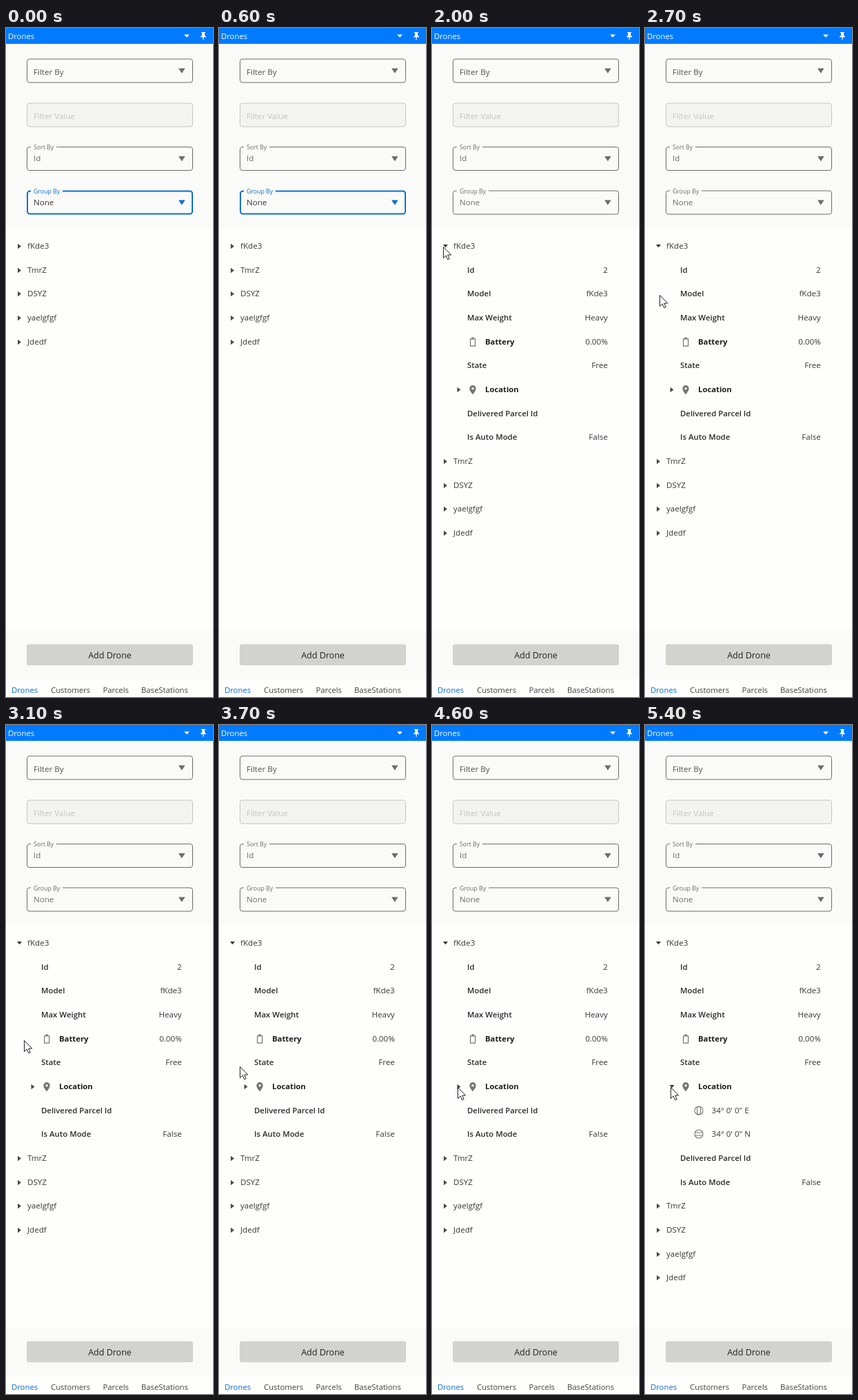
These frames come from a looping animation (300x970 px, 5.5 s). An HTML page:

```html
<!DOCTYPE html>
<html lang="en">
<head>
<meta charset="utf-8">
<title>Drones panel</title>
<style>
  html, body { margin: 0; width: 100%; height: 100%; overflow: hidden; background: #fefefc; }
  svg { display: block; width: 300px; height: 970px; }
  text { font-family: "Open Sans", "Noto Sans", sans-serif; white-space: pre; }
</style>
</head>
<body>
<svg id="stage" viewBox="0 0 300 970" xmlns="http://www.w3.org/2000/svg"></svg>
<script>
const LOOP = 5500, STEP = 100;
const OPEN_DRONE = 1800, OPEN_LOCATION = 4800;
const BLUE = '#0c70cf', GREY = '#6c6c6c', INK = '#363636';

// time, x, y of the pointer tip
const pointerPath = [
  [1000, -14, 352], [1300, 17, 319], [1600, 16, 317], [2300, 16, 317],
  [3100, 26, 457], [3600, 29, 490], [4300, 37, 525], [LOOP, 37, 525]
];

const text = (x, y, str, { size = 11.4, fill = INK, weight = 400, anchor = 'start' } = {}) =>
  `<text x="${x}" y="${y}" font-size="${size}" fill="${fill}" font-weight="${weight}" text-anchor="${anchor}">${str}</text>`;
const rect = (x, y, w, h, fill, extra = '') =>
  `<rect x="${x}" y="${y}" width="${w}" height="${h}" fill="${fill}" ${extra}/>`;
const path = (d, fill, extra = '') => `<path d="${d}" fill="${fill}" ${extra}/>`;
const group = (id, body) => `<g id="${id}">${body}</g>`;

// The outline lies inside the field's 241 x 35 box, whatever its width.
function field(y, value, { label, gap = 0, stroke = GREY, color = GREY, width = 1, fill = 'none', arrow = true, valueY = 21 } = {}) {
  let out = rect(30 + width / 2, y + width / 2, 241 - width, 35 - width, fill,
    `rx="3.5" stroke="${stroke}" stroke-width="${width}"`);
  if (label) {
    out += rect(36, y - 1, gap, 4, '#fafaf8');
    out += text(40, y + 4, label, { size: 8.75, fill: stroke });
  }
  out += text(40, y + valueY, value, { size: 11.6, fill: color });
  if (arrow) out += path(`M250 ${y + 14}h9.6l-4.8 7.2z`, stroke);
  return out;
}

const rowY = i => Math.round(316 + 34.67 * i);
const closedArrow = (x, y) => path(`M${x} ${y - 3.2}l5 3.7l-5 3.7z`, '#4a4a4a');
const openArrow = (x, y) => path(`M${x - 1} ${y - 2}h7l-3.5 4.3z`, '#333');

const batteryIcon = y =>
  path(`M55.6 ${y - 4.2}h7v10.4h-7z`, 'none', 'stroke="#757575" stroke-width="1.2"') +
  rect(57.2, y - 6.4, 3.8, 2, '#757575');
const placeIcon = y =>
  path(`M59 ${y - 6}a4.7 4.7 0 0 0 -4.7 4.7c0 3.5 4.7 8.5 4.7 8.5s4.7 -5 4.7 -8.5a4.7 4.7 0 0 0 -4.7 -4.7zm0 3a1.7 1.7 0 1 1 0 3.4a1.7 1.7 0 1 1 0 -3.4z`, '#757575', 'fill-rule="evenodd"');
const globeIcon = (y, inner) =>
  `<g fill="none" stroke="#757575" stroke-width="1.1"><circle cx="78" cy="${y}" r="6"/>${inner}</g>`;
const longitudeIcon = y => globeIcon(y, `<ellipse cx="78" cy="${y}" rx="2.6" ry="6"/>`);
const latitudeIcon = y => globeIcon(y, `<path d="M72.5 ${y - 2}h11M72.5 ${y + 2}h11"/>`);

function property(i, label, value = '') {
  const y = rowY(i);
  return text(51, y + 4, label, { size: 11.4, weight: 600, fill: '#2a2a2a' }) +
    text(254.7, y + 4, value, { size: 11.6, anchor: 'end' });
}

function heading(i, label, icon, value = '') {
  const y = rowY(i);
  return icon(y) + text(77, y + 4, label, { size: 11.3, weight: 700, fill: '#1c1c1c' }) +
    text(254.7, y + 4, value, { size: 11.6, anchor: 'end' });
}

function tree(droneOpen, locationOpen) {
  let row = 0, out = '';
  const drone = (name, open) => {
    const y = rowY(row++);
    out += (open ? openArrow : closedArrow)(17, y) + text(31, y + 4, name, { size: 11.6 });
  };
  drone('fKde3', droneOpen);
  if (droneOpen) {
    out += property(row++, 'Id', '2') + property(row++, 'Model', 'fKde3') +
      property(row++, 'Max Weight', 'Heavy') +
      heading(row++, 'Battery', batteryIcon, '0.00%') + property(row++, 'State', 'Free');
    out += (locationOpen ? openArrow : closedArrow)(36.5, rowY(row)) +
      heading(row++, 'Location', placeIcon);
    if (locationOpen) {
      for (const [icon, side] of [[longitudeIcon, 'E'], [latitudeIcon, 'N']]) {
        const y = rowY(row++);
        out += icon(y) + text(96.5, y + 4, `34° 0' 0" ${side}`, { size: 11.6 });
      }
    }
    out += property(row++, 'Delivered Parcel Id') + property(row++, 'Is Auto Mode', 'False');
  }
  ['TmrZ', 'DSYZ', 'yaelgfgf', 'Jdedf'].forEach(name => drone(name, false));
  return out;
}

const header = rect(0, 0, 300, 23, '#007bff') +
  text(3, 16, 'Drones', { fill: '#fff', size: 11.3 }) +
  path('M258 9.5h8l-4 4.2z', '#fff') +
  path('M283 6h6v1h-1v4l2 1.2v1h-3.4v3.8h-1.2v-3.8H282v-1l2 -1.2v-4h-1z', '#fff');

const filters = rect(0, 23, 300, 266, '#fafaf8') +
  field(44.5, 'Filter By', { color: '#505050', valueY: 23.5 }) +
  field(108.5, 'Filter Value', { stroke: '#c6c6c4', color: '#c3c3c1', fill: '#f3f3f1', arrow: false, valueY: 23.5 }) +
  field(172, 'Id', { label: 'Sort By', gap: 37 });

const groupField = { label: 'Group By', gap: 46 };
const footer = rect(0, 873, 300, 71, '#fafaf8') +
  rect(30, 893.5, 241, 30.5, '#d2d2cf', 'rx="3"') +
  text(150.5, 913.5, 'Add Drone', { size: 12.5, fill: '#222', anchor: 'middle' }) +
  [[8, 'Drones'], [65, 'Customers'], [140.5, 'Parcels'], [196, 'BaseStations']]
    .map(([x, name], i) => text(x, 964, name, { size: 11.3, fill: i ? '#404040' : '#0a6cd6' })).join('');

document.getElementById('stage').innerHTML = header + filters +
  group('focused', field(235.5, 'None', { ...groupField, stroke: BLUE, color: INK, width: 2 })) +
  group('blurred', field(235.5, 'None', groupField)) +
  group('closed', tree(false, false)) +
  group('opened', tree(true, false)) +
  group('located', tree(true, true)) +
  footer +
  group('pointer', path('M.5 .5v16l3.7 -3.5l2.5 5.8l2.5 -1.1l-2.5 -5.6h5z', '#fff', 'stroke="#222" stroke-width="1"'));

const show = (id, visible) =>
  document.getElementById(id).setAttribute('display', visible ? 'inline' : 'none');

function pointerAt(t) {
  const next = Math.max(1, pointerPath.findIndex(p => p[0] > t));
  const [t0, x0, y0] = pointerPath[next - 1], [t1, x1, y1] = pointerPath[next];
  const k = (t - t0) / (t1 - t0);
  return [x0 + (x1 - x0) * k, y0 + (y1 - y0) * k].map(Math.round);
}

function draw(t) {
  show('focused', t < OPEN_DRONE);
  show('blurred', t >= OPEN_DRONE);
  show('closed', t < OPEN_DRONE);
  show('opened', t >= OPEN_DRONE && t < OPEN_LOCATION);
  show('located', t >= OPEN_LOCATION);
  show('pointer', t >= pointerPath[0][0]);
  document.getElementById('pointer').setAttribute('transform', `translate(${pointerAt(t)})`);
}

const start = performance.now();
function tick() {
  const t = (performance.now() - start) % LOOP;
  draw(Math.floor(t / STEP) * STEP);
  requestAnimationFrame(tick);
}
tick();
</script>
</body>
</html>
```
